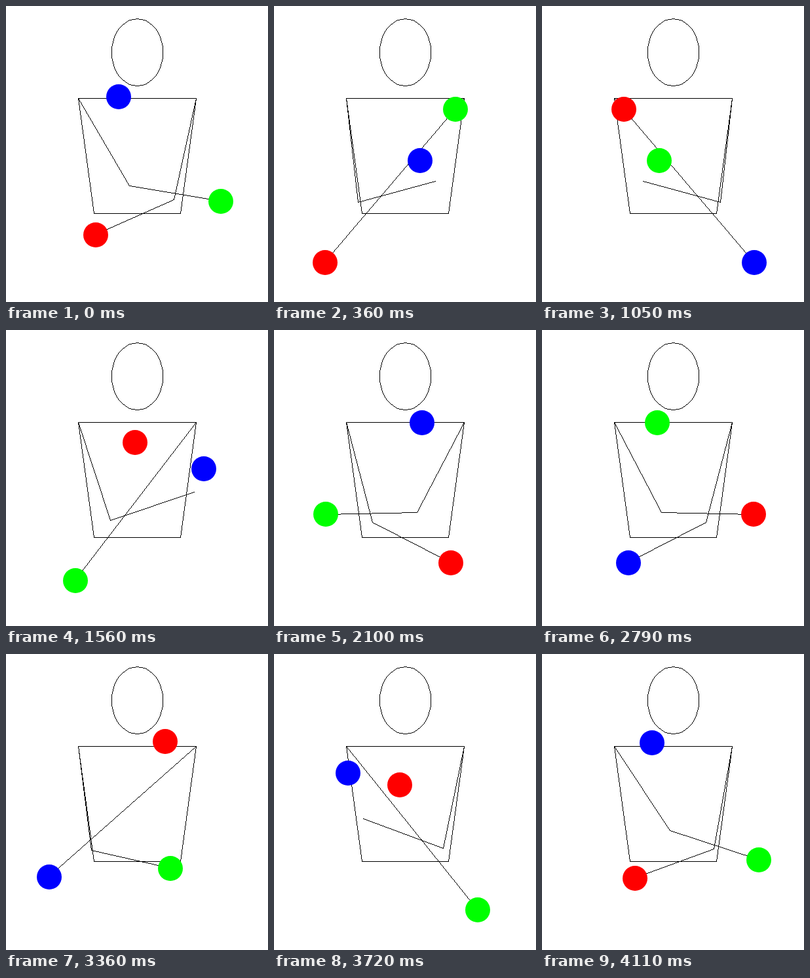
Animation, 400 px wide and 450 px high, one loop 4140 ms. Source, as an HTML page with a canvas:

```html
<!DOCTYPE html>
<html lang="en">
<head>
<meta charset="utf-8">
<title>Juggler</title>
<style>
  html, body { margin: 0; width: 100%; height: 100%; overflow: hidden; background: #fff; }
  canvas { display: block; }
</style>
</head>
<body>
<canvas id="stage" width="400" height="450"></canvas>
<script>
const ctx = document.getElementById('stage').getContext('2d');

// Times are in steps of 30 ms; a beat is one throw.
const STEP = 30, BEAT = 23, LOOP = 6 * BEAT;
const HOLD = 1.3 * BEAT, FLIGHT = 1.7 * BEAT, EMPTY = 0.7 * BEAT;
const RELEASE = 22.99, CATCH = RELEASE + FLIGHT;

// x is measured from the middle of the body, y from the top of the stage.
const MID = 200, APEX = 132.85, GRAVITY = 0.429;
const THROW_X = 126.7, CATCH_X = 39.1;
const HAND_Y = APEX + GRAVITY * (FLIGHT / 2) ** 2;
const THROW_V = { x: -(THROW_X + CATCH_X) / FLIGHT, y: -GRAVITY * FLIGHT };
const CATCH_V = { x: 1.81, y: 7.44 };

const SHOULDER = { x: 90, y: 140 };
const LIMB = 160, REACH_Z = 118;
const HEAD_SIDES = 40, RADIUS = 19;
const BALLS = [['#f00', 0], ['#0f0', 4 * BEAT], ['#00f', 2 * BEAT]];

const mod = (a, b) => ((a % b) + b) % b;

function hermite(p, v, q, w, span, t) {
  const s = t / span, r = 1 - s;
  return p + (q - p) * s * s * (3 - 2 * s) + span * (v * s * r * r - w * s * s * r);
}

// The hand on the left shoulder; time counts from its catch.
function handAt(time) {
  const t = mod(time, 2 * BEAT);
  if (t < HOLD) return {
    x: hermite(CATCH_X, CATCH_V.x, THROW_X, THROW_V.x, HOLD, t),
    y: hermite(HAND_Y, CATCH_V.y, HAND_Y, THROW_V.y, HOLD, t)
  };
  return {
    x: hermite(THROW_X, THROW_V.x, CATCH_X, CATCH_V.x, EMPTY, t - HOLD),
    y: hermite(HAND_Y, THROW_V.y, HAND_Y, CATCH_V.y, EMPTY, t - HOLD)
  };
}

function ballAt(time) {
  const u = mod(time - RELEASE, LOOP), t = u % (3 * BEAT);
  const side = u < 3 * BEAT ? 1 : -1;
  const p = t < FLIGHT
    ? { x: -THROW_X - THROW_V.x * t, y: APEX + GRAVITY * (t - FLIGHT / 2) ** 2 }
    : handAt(t - FLIGHT);
  return { x: p.x * side, y: p.y };
}

// Elbow hangs straight down from a 3D arm; null when the arm is fully stretched.
function elbowFor(hx, hy) {
  const d2 = hx * hx + hy * hy + REACH_Z * REACH_Z;
  const r2 = LIMB * LIMB - d2 / 4;
  if (r2 <= 0) return null;
  const d = Math.sqrt(d2), ux = hx / d, uy = hy / d;
  const drop = Math.sqrt(1 - uy * uy), r = Math.sqrt(r2);
  return { x: hx / 2 - r * ux * uy / drop, y: hy / 2 + r * drop };
}

// Hard-edged line, one pixel wide.
function line(x0, y0, x1, y1) {
  const n = Math.max(Math.abs(x1 - x0), Math.abs(y1 - y0));
  for (let i = 0; i <= n; i++) {
    const s = n ? i / n : 0;
    ctx.fillRect(Math.round(x0 + (x1 - x0) * s), Math.round(y0 + (y1 - y0) * s), 1, 1);
  }
}

function polyline(points) {
  for (let i = 1; i < points.length; i++) line(...points[i - 1], ...points[i]);
}

const head = Array.from({ length: HEAD_SIDES + 1 }, (_, i) => {
  const a = i * 2 * Math.PI / HEAD_SIDES;
  return [MID + Math.round(39 * Math.cos(a)), 70 + Math.round(51 * Math.sin(a))];
});
const torso = [[110, 140], [290, 140], [266, 315], [134, 315], [110, 140]];

function disc(cx, cy) {
  ctx.beginPath();
  ctx.arc(cx, cy, RADIUS, 0, 2 * Math.PI);
  ctx.fill();
}

function arm(hand, side) {
  const hx = hand.x + SHOULDER.x, hy = hand.y - 1 - SHOULDER.y;
  const at = (x, y) => [
    MID + side * Math.round(x - SHOULDER.x),
    Math.round(SHOULDER.y + y)
  ];
  const elbow = elbowFor(hx, hy);
  const points = [at(0, 0), at(hx, hy)];
  if (elbow) points.splice(1, 0, at(elbow.x, elbow.y));
  polyline(points);
}

function draw(n) {
  ctx.fillStyle = '#fff';
  ctx.fillRect(0, 0, 400, 450);
  ctx.fillStyle = '#000';
  polyline(head);
  polyline(torso);
  arm(handAt(n - CATCH), 1);
  arm(handAt(n + BEAT - CATCH), -1);
  for (const [color, lead] of BALLS) {
    const p = ballAt(n + lead);
    ctx.fillStyle = color;
    disc(MID + 1 + Math.round(p.x), Math.round(p.y));
  }
}

const start = performance.now();
let shown = -1;
function tick() {
  const n = Math.floor(Math.max(0, performance.now() - start) / STEP) % LOOP;
  if (n !== shown) draw(shown = n);
  requestAnimationFrame(tick);
}
tick();
</script>
</body>
</html>
```
